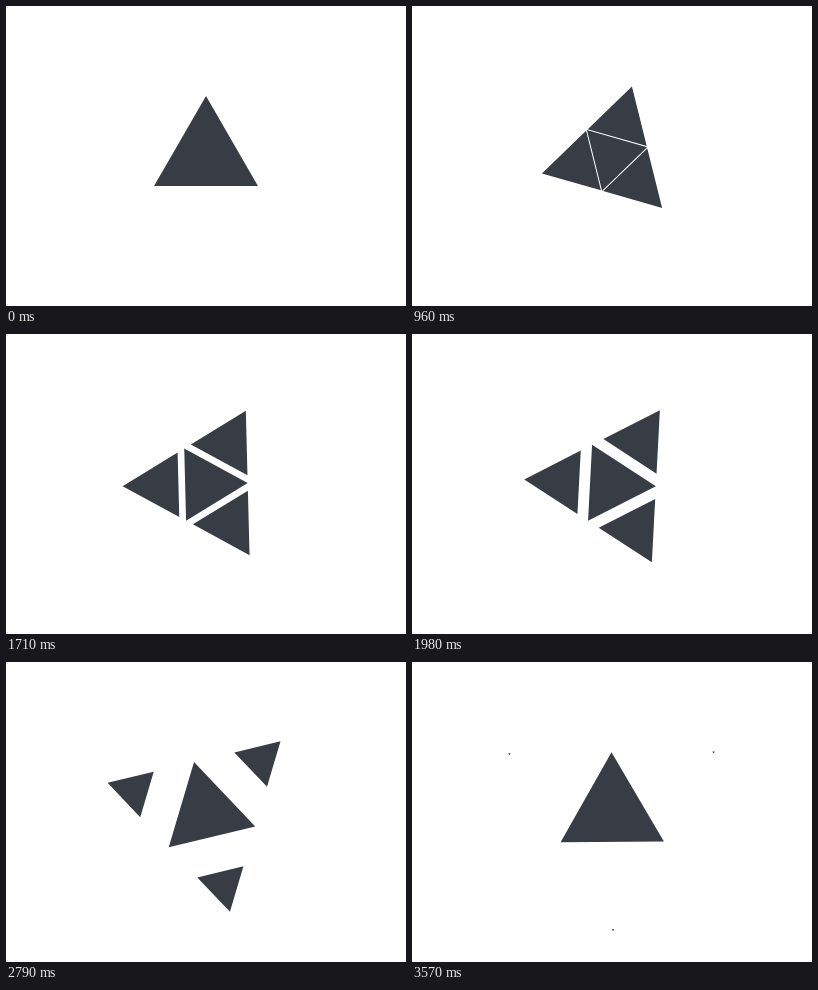
Recreate the animation shown at these times as an HTML page. Size 400 by 300 pixels, loop 3600 ms.

```html
<!DOCTYPE html>
<html lang="en">
<head>
<meta charset="utf-8">
<title>Triangles</title>
<style>
  html, body { margin: 0; width: 100%; height: 100%; overflow: hidden; background: #fff; }
  svg { display: block; width: 100%; height: 100%; }
</style>
</head>
<body>
<svg viewBox="0 0 400 300"><path id="shape" fill="#383d45"/></svg>
<script>
const LOOP = 3600;
const TURNS = [-90, 30, 150].map(deg => deg * Math.PI / 180);
const shape = document.getElementById('shape');

const polar = (angle, radius) => [Math.cos(angle) * radius, Math.sin(angle) * radius];

// A negative radius points the triangle down.
function triangle(cx, cy, radius) {
  const points = TURNS.map(a => {
    const [x, y] = polar(a, radius);
    return `${(cx + x).toFixed(3)} ${(cy + y).toFixed(3)}`;
  });
  return `M${points.join('L')}Z`;
}

function draw(time) {
  const t = (time % LOOP) / LOOP;
  const size = 30 * 2 ** t;
  const split = t ** 3;
  const outer = TURNS.map(a =>
    triangle(...polar(a, size * (1 + split)), size * (1 - split)));

  shape.setAttribute('d', triangle(0, 0, -size) + outer.join(''));
  shape.setAttribute('transform', `translate(200 150) rotate(${60 * t})`);
}

function tick() {
  draw(performance.now());
  requestAnimationFrame(tick);
}

draw(0);
requestAnimationFrame(tick);
</script>
</body>
</html>
```
